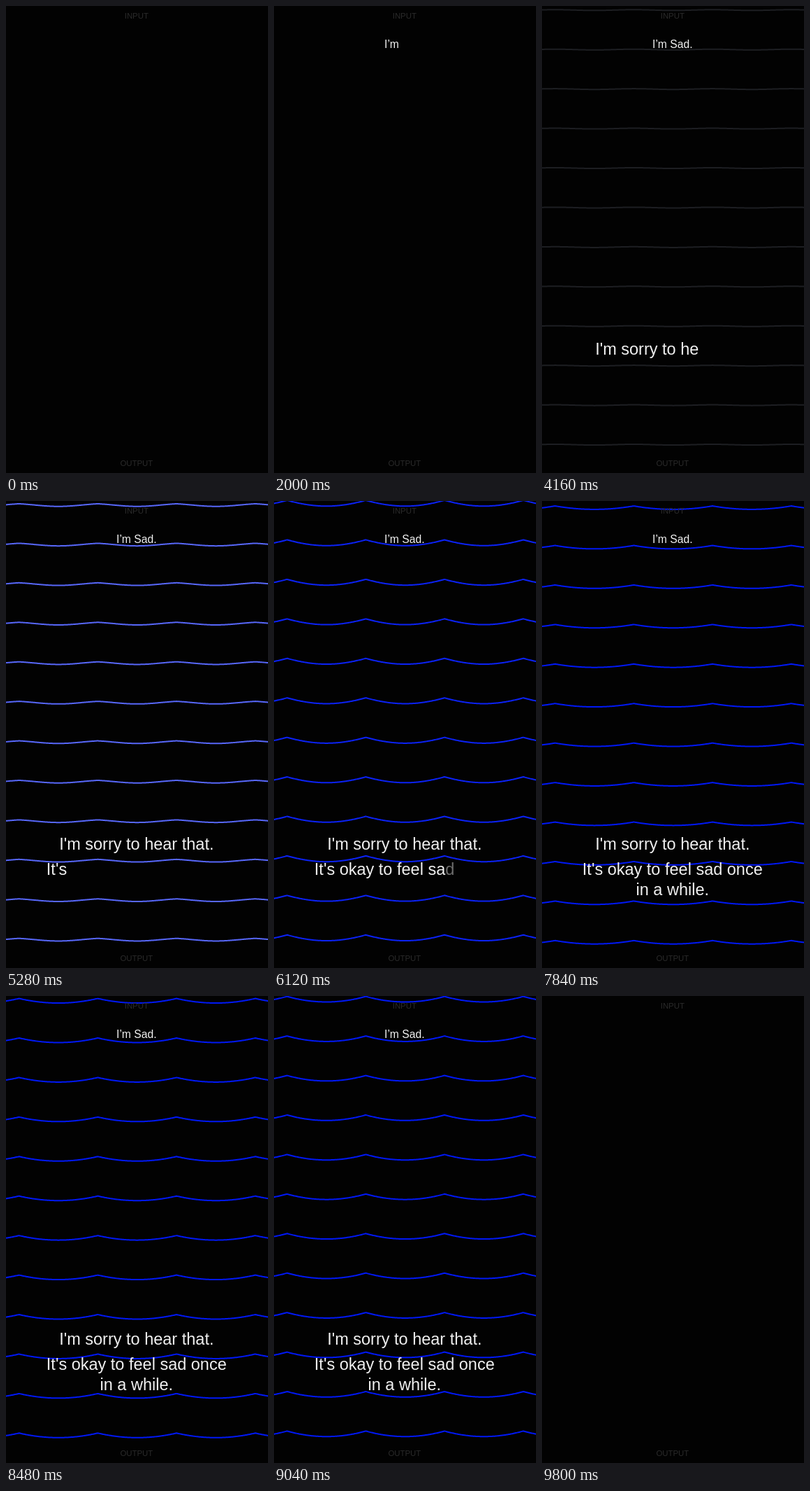
These frames come from a looping animation (375x667 px, 10 s). An HTML page with a canvas:

```html
<!DOCTYPE html>
<html lang="en">
<head>
<meta charset="utf-8">
<title>Input / Output</title>
<style>
  html, body { margin: 0; width: 100%; height: 100%; overflow: hidden; background: #020202; }
  canvas { display: block; width: 375px; height: 667px; }
</style>
</head>
<body>
<canvas id="stage" width="375" height="667"></canvas>
<script>
const ctx = document.getElementById('stage').getContext('2d');
const W = 375, H = 667, CENTER = 186.8;
const LOOP = 10000, FRAME = 40;
const WAVE_COUNT = 12, WAVE_GAP = 56.43, CREST_X = 18.7, CREST_GAP = 112.7;
const BOB_PERIOD = 1040, BOB_TOP = 7160;

const clamp = v => Math.min(1, Math.max(0, v));
const ramp = (t, from, to) => clamp((t - from) / (to - from));
const smooth = u => u * u * (3 - 2 * u);
const mix = (a, b, u) => a + (b - a) * u;

// Draws the first `shown` characters of a centred line; a fractional last one is translucent.
function drawLine(text, size, baseline, color, shown = text.length, alpha = 1) {
  if (shown <= 0) return;
  ctx.font = `${size}px "Liberation Sans", Arial, sans-serif`;
  ctx.fillStyle = color;
  const left = CENTER - ctx.measureText(text).width / 2;
  const whole = Math.min(text.length, Math.floor(shown));
  const done = text.slice(0, whole);
  ctx.globalAlpha = alpha;
  ctx.fillText(done, left, baseline);
  if (whole < text.length) {
    ctx.globalAlpha = alpha * (shown - whole);
    ctx.fillText(text[whole], left + ctx.measureText(done).width, baseline);
  }
  ctx.globalAlpha = 1;
}

function drawWaves(t, alpha) {
  const growth = ramp(t, 3500, 6200) ** 2;
  const calm = 1 - growth;
  const bob = Math.sin(Math.PI * (t - BOB_TOP) / BOB_PERIOD) ** 2;
  const drop = bob ** 1.6;
  const trough = 7.4 + 6.7 * drop - 1.4 * calm;
  const height = growth * (8.8 - 5.8 * drop) + 0.6 * calm;
  const tint = smooth(ramp(t, 3400, 6500));
  const [r, g, b] = [mix(255, 0, tint), mix(255, 24, tint), mix(255, 246, tint)];

  ctx.globalAlpha = alpha * smooth(ramp(t, 3840, 5280));
  ctx.strokeStyle = `rgb(${r}, ${g}, ${b})`;
  ctx.lineWidth = 2;
  ctx.lineJoin = 'round';
  for (let i = 0; i < WAVE_COUNT; i++) {
    ctx.beginPath();
    for (let x = -2; x <= W + 2; x++) {
      const phase = (x - CREST_X) / CREST_GAP;
      const u = 2 * (phase - Math.floor(phase)) - 1;
      // Rounded swell that sharpens into cusps as it grows.
      const sag = mix((1 + Math.cos(Math.PI * u)) / 2, 1 - u * u, growth);
      ctx.lineTo(x, i * WAVE_GAP + trough - height * (1 - sag));
    }
    ctx.stroke();
  }
  ctx.globalAlpha = 1;
}

function render(t) {
  ctx.fillStyle = '#020202';
  ctx.fillRect(0, 0, W, H);
  const alpha = 1 - ramp(t, 9600, 9800);

  drawWaves(t, alpha);
  drawLine('INPUT', 11.4, 18, '#2b2b2b');
  drawLine('OUTPUT', 11.4, 657, '#2b2b2b');

  const typed = t < 1728 ? 0 : Math.floor((t - 1728) / 130.5) + 1;
  drawLine('I’m Sad.', 15.7, 60, '#f2f2f2', typed, alpha);

  const first = "I'm sorry to hear that.";
  const second = "It's okay to feel sad once";
  const third = 'in a while.';
  const reply = (t - 5044) / 52.6;
  drawLine(first, 23.5, 498, '#f0f0f0', (t - 3377) / 52.2, alpha);
  drawLine(second, 23.5, 534, '#f0f0f0', reply, alpha);
  drawLine(third, 23.5, 563, '#f0f0f0', reply - second.length - 1, alpha);
}

const start = performance.now();
function tick() {
  const t = (performance.now() - start) % LOOP;
  render(Math.floor(t / FRAME) * FRAME);
  requestAnimationFrame(tick);
}
tick();
</script>
</body>
</html>
```
